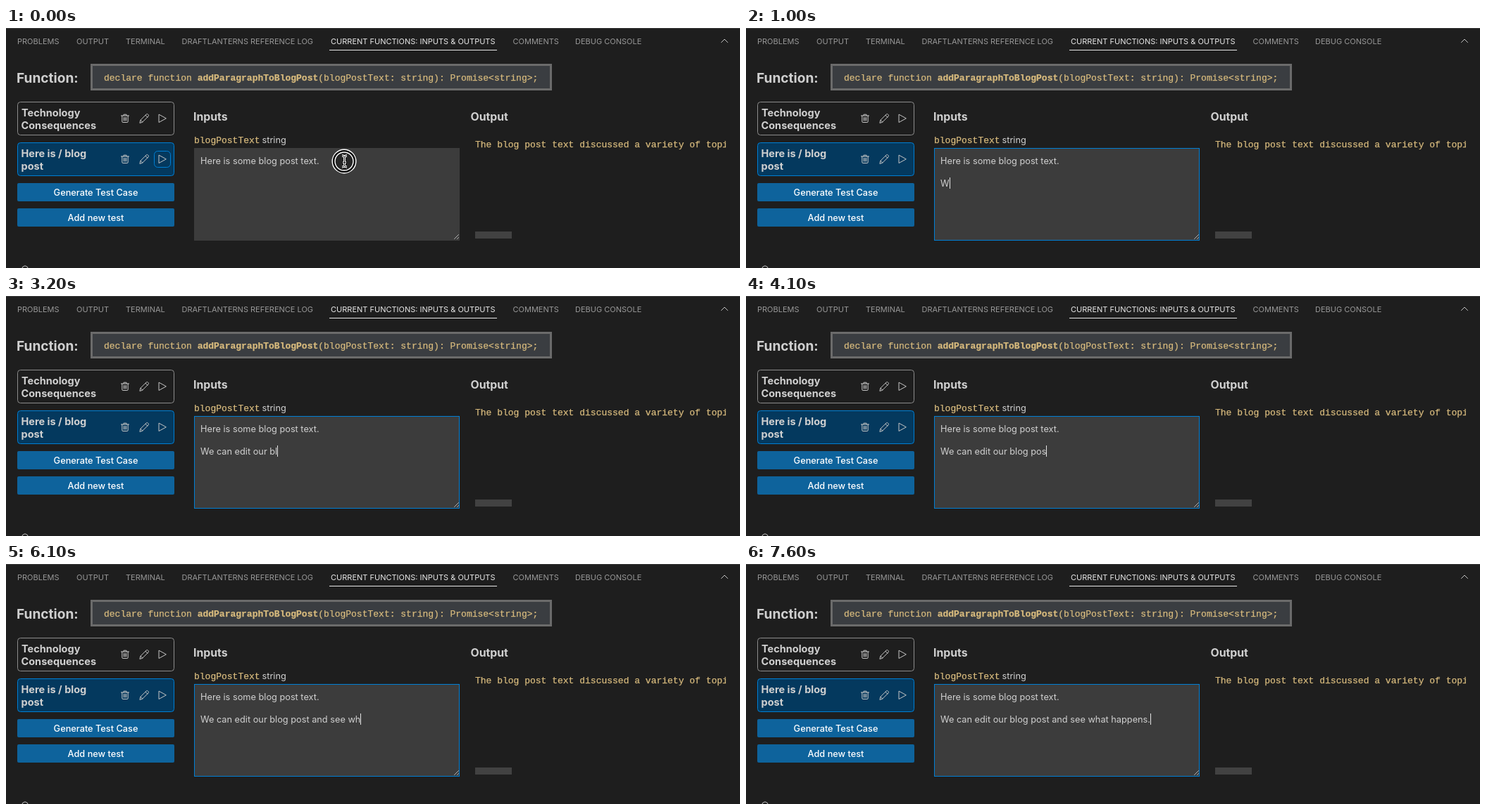
An HTML page for the animation above (8000 ms loop, 1042 by 342 pixels).

```html
<!DOCTYPE html>
<html lang="en">
<head>
<meta charset="utf-8">
<title>Function test panel</title>
<style>
  html, body { margin: 0; width: 100%; height: 100%; overflow: hidden; background: #1e1e1e; }
  svg { display: block; width: 1042px; height: 342px; }
  text { font: 12.75px Inter, "Open Sans", sans-serif; fill: #d0d0d0; white-space: pre; }
  .tab { font-size: 11px; fill: #989898; }
  .tab.on { fill: #e7e7e7; }
  .h2 { font-size: 19.1px; font-weight: 700; }
  .h3 { font-size: 15.8px; font-weight: 700; }
  .name { font-size: 14.5px; font-weight: 700; }
  .btn { font-weight: 500; fill: #fff; text-anchor: middle; }
  .code { font: 13px "Liberation Mono", monospace; fill: #d7ba7d; stroke: #d7ba7d; stroke-width: .25px; }
  .code .fn { font-weight: 700; }
  .line { fill: none; stroke: #c5c5c5; stroke-linecap: round; stroke-linejoin: round; }
  .focus { fill: none; stroke: #007fd4; }
</style>
</head>
<body>
<svg viewBox="0 0 1042 342">
  <defs>
    <clipPath id="outputClip"><rect x="660" y="150" width="362" height="30"/></clipPath>
    <g id="icons" class="line">
      <path d="M163.5 125h11M167 125v-1.8h4v1.8M164.8 125v8.2q0 1.3 1.3 1.3h5.8q1.3 0 1.3-1.3v-8.2M167.2 127.5v4.5M169 127.5v4.5M170.8 127.5v4.5"/>
      <path d="M190 135l1-3.8 8.3-8.3q1-1 2.2.2l.5.5q1 1.100 0 2.200l-8.300 8.300zM198 124.300l2.800 2.800M191 131.200l2.700 2.800"/>
      <path d="M217 123.500v11l10-5.500z"/>
    </g>
  </defs>

  <rect width="1042" height="1" fill="#3e3e3e"/>
  <g id="tabs"></g>
  <rect x="459" y="31" width="238" height="1" fill="#e7e7e7"/>
  <path class="line" d="M1015.500 20.500l4.500-4.500 4.500 4.500"/>

  <text class="h2" x="15" y="78">Function:</text>
  <rect x="121.500" y="52.500" width="652" height="35" fill="#3a3d41" stroke="#6b6b6b" stroke-width="3"/>
  <text class="code" x="139" y="75">declare function <tspan class="fn">addParagraphToBlogPost</tspan>(blogPostText: string): Promise&lt;string&gt;;</text>

  <rect x="16.500" y="105.500" width="222" height="47" rx="4" fill="#1e1e1e" stroke="#8c8c8c"/>
  <text class="name" x="22" y="126">Technology</text>
  <text class="name" x="21.500" y="144">Consequences</text>
  <use href="#icons"/>

  <rect x="16.500" y="163.500" width="222" height="47" rx="4" fill="#04395e" stroke="#007fd4"/>
  <text class="name" x="21.500" y="184">Here is / blog</text>
  <text class="name" x="21.500" y="202">post</text>
  <use href="#icons" y="58"/>
  <rect id="playFocus" class="focus" x="210.500" y="175.500" width="23" height="23" rx="5"/>

  <rect x="16" y="221" width="223" height="26" rx="2" fill="#0e639c"/>
  <text class="btn" x="127.500" y="239">Generate Test Case</text>
  <rect x="16" y="257" width="223" height="26" rx="2" fill="#0e639c"/>
  <text class="btn" x="127.500" y="275">Add new test</text>

  <text class="h3" x="266" y="132">Inputs</text>
  <text class="code" x="267" y="164">blogPostText</text>
  <text x="363.500" y="164">string</text>
  <rect x="267" y="171" width="377" height="132" fill="#3c3c3c"/>
  <path class="line" d="M636.500 300.500l6-6M640.500 300.500l2-2" stroke-width=".9"/>
  <rect id="areaFocus" class="focus" x="267.500" y="171.500" width="376" height="131"/>
  <text id="first" x="276" y="194">Here is some blog post text.</text>
  <text id="typed" x="276" y="226"></text>
  <rect id="caret" width="1" height="16" fill="#e4e4e4"/>

  <text class="h3" x="659.500" y="132">Output</text>
  <g clip-path="url(#outputClip)"><text class="code" x="666" y="170">The blog post text discussed a variety of topics</text></g>
  <rect x="666" y="290" width="52" height="10" fill="#424242"/>
  <path class="line" d="M23 342q0-2 2-2.200q2-2 4 0q2 .2 2 2.200" stroke="#858585"/>

  <g id="pointer" fill="none">
    <g id="ring">
      <circle cx="480" cy="190" r="15" fill="#262626" stroke="#000" stroke-width="4"/>
      <circle cx="480" cy="190" r="16.800" stroke="#fff" stroke-width="1.400"/>
      <circle cx="480" cy="190" r="13" stroke="#fff" stroke-width="1.400"/>
    </g>
    <path id="beam" d="M477 182q3 0 3.500 2q.5-2 3.500-2M480.500 184v12M477 198q3 0 3.500-2q.5 2 3.500 2M478.500 191.500h4" stroke="#fff" stroke-width="2.800"/>
    <use href="#beam" id="core"/>
    <path d="M477 182q3 0 3.500 2q.5-2 3.500-2M480.500 184v12M477 198q3 0 3.500-2q.5 2 3.500 2M478.500 191.500h4" stroke="#111" stroke-width=".9"/>
  </g>
</svg>
<script>
const LOOP = 8000;
const SENTENCE = "We can edit our blog post and see what happens.";
// Time of each keystroke, in tenths of a second
const KEYS = [
  10, 11, 13, 14, 15, 16, 18, 20, 21, 22, 24, 25, 26, 27, 28, 29,
  30, 32, 34, 35, 36, 39, 40, 41, 42, 45, 50, 51, 52, 52, 54, 55,
  57, 58, 60, 61, 62, 63, 63, 65, 66, 67, 69, 70, 71, 72, 76
];
const CLICK = 100, RELEASE = 300, ENTER = 500, ENTER_AGAIN = 700;
const TABS = [
  [16, "PROBLEMS"], [100, "OUTPUT"], [170, "TERMINAL"],
  [249.5, "DRAFTLANTERNS REFERENCE LOG"],
  [461, "CURRENT FUNCTIONS: INPUTS & OUTPUTS"],
  [719.5, "COMMENTS"], [808, "DEBUG CONSOLE"]
];

const el = id => document.getElementById(id);
const show = (id, on) => { el(id).style.visibility = on ? "visible" : "hidden"; };

for (const [x, label] of TABS) {
  const tab = document.createElementNS("http://www.w3.org/2000/svg", "text");
  tab.setAttribute("class", label.startsWith("CURRENT") ? "tab on" : "tab");
  tab.setAttribute("x", x);
  tab.setAttribute("y", 23);
  tab.textContent = label;
  el("tabs").append(tab);
}

function placeCaret(t) {
  const line = t < ENTER ? 0 : t < ENTER_AGAIN ? 1 : 2;
  const text = [el("first"), null, el("typed")][line];
  const width = text && text.textContent ? text.getComputedTextLength() : 0;
  el("caret").setAttribute("x", Math.round(276 + width));
  el("caret").setAttribute("y", 181 + line * 16);
}

function draw(t) {
  const count = KEYS.filter(k => k * 100 <= t).length;
  el("typed").textContent = SENTENCE.slice(0, count);
  placeCaret(t);
  show("caret", t >= CLICK);
  show("areaFocus", t >= CLICK);
  show("playFocus", t < CLICK);
  el("pointer").style.display = t < ENTER ? "" : "none";
  el("ring").style.display = t < RELEASE ? "" : "none";
}

const start = performance.now();
function tick() {
  draw((performance.now() - start) % LOOP);
  requestAnimationFrame(tick);
}
draw(0);
requestAnimationFrame(tick);
</script>
</body>
</html>
```
